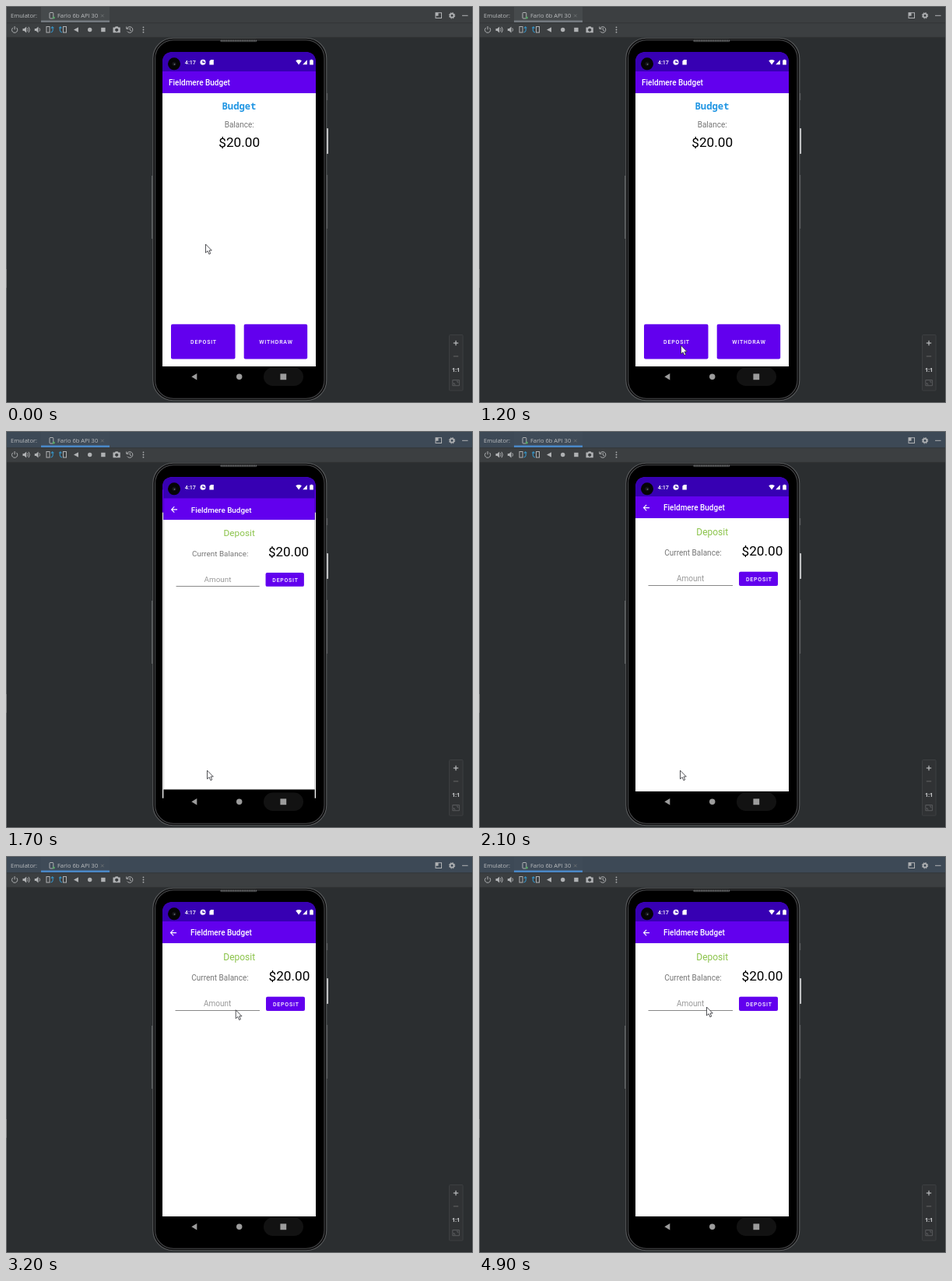
Write an HTML page that moves like this. It is 600 px wide and 510 px high and loops after 5 s.

```html
<!DOCTYPE html>
<html lang="en">
<head>
<meta charset="utf-8">
<title>Emulator demo</title>
<style>
html, body { margin: 0; width: 100%; height: 100%; overflow: hidden; background: #2b2e30; }
svg { display: block; width: 600px; height: 510px; }
text { font-family: Roboto, sans-serif; white-space: pre; }
.ide { font: 7.5px "Open Sans", "Noto Sans", sans-serif; fill: #bbbdbf; }
.title { font-size: 10px; font-weight: 500; fill: #fff; }
.label { font-size: 10px; fill: #757575; }
.money { font-size: 17.2px; fill: #000; text-anchor: middle; }
.btn { font-size: 7px; font-weight: 500; letter-spacing: .8px; fill: #fff; text-anchor: middle; }
.mid { text-anchor: middle; }
.line { fill: none; stroke: #afb1b3; stroke-width: 1; }
.blue { fill: none; stroke: #3592c4; stroke-width: 1.1; }
.solid { fill: #afb1b3; }
</style>
</head>
<body>
<svg viewBox="0 0 600 510" xmlns="http://www.w3.org/2000/svg">
  <defs>
    <clipPath id="screen"><path d="M201 486V73q0-14 14-14H384q14 0 14 14V486z"/></clipPath>
    <filter id="blur" x="-20%" y="-40%" width="140%" height="180%"><feGaussianBlur stdDeviation="2"/></filter>
    <g id="bars">
      <rect x="201" y="59" width="197" height="427" fill="#000"/>
      <rect x="201" y="59" width="197" height="54" fill="#6200ee"/>
      <rect x="201" y="59" width="197" height="25" fill="#3700b3"/>
      <rect x="201" y="112" width="197" height="351" fill="#fff"/>
    </g>
  </defs>

  <!-- IDE window -->
  <rect width="600" height="510" fill="#2b2e30"/>
  <rect width="600" height="40" fill="#3c3f41"/>
  <rect id="header" width="600" height="21.5"/>
  <rect id="tab" x="45" y="1" width="88" height="20"/>
  <rect id="underline" x="45" y="18.5" width="88" height="2.5"/>
  <path d="M0 21.8H600M0 40.3H600" stroke="#313335" stroke-width=".8"/>
  <rect x=".5" y=".5" width="599" height="509" stroke="#6c6e70" fill="none"/>
  <path d="M.4 338V362" stroke="#a0a0a0" stroke-width=".6"/>
  <text class="ide" x="6" y="15">Emulator:</text>
  <text class="ide" x="66" y="15">Farlo 6b API 30</text>
  <path d="M122 10.7l3.6 3.6m0-3.6l-3.6 3.6" stroke="#737678" stroke-width=".8"/>
  <rect class="line" x="56" y="8.5" width="4.8" height="7.5" rx=".8"/>
  <circle cx="61.3" cy="15" r="1.6" fill="#59a869"/>
  <rect class="line" x="552" y="8.7" width="7.5" height="6.8"/>
  <rect class="solid" x="552" y="8.7" width="3.5" height="4"/>
  <circle class="line" cx="573" cy="12.3" r="2.4" style="stroke-width:1.7"/>
  <circle class="line" cx="573" cy="12.3" r="3.7" stroke-dasharray="1.6 1.3"/>
  <path class="line" d="M586 12.3h7.5"/>

  <!-- Emulator tools -->
  <path class="line" d="M9 27.8a3.6 3.6 0 1 0 4.3 0M11.1 26v4.3"/>
  <path class="solid" d="M21.5 29h2l2.7-2.5v8l-2.7-2.5h-2zM36.8 29h2l2.7-2.5v8l-2.7-2.5h-2z"/>
  <path class="line" d="M27.5 28.4q1.7 2.1 0 4.2M29 26.8q3 3.7 0 7.4M42.8 28.4q1.7 2.1 0 4.2"/>
  <rect class="line" x="52" y="26.5" width="4" height="7.5"/>
  <path class="blue" d="M57.5 34q4-1 2.2-6.5M58 28.7l1.6-2 1.8 1.6"/>
  <rect class="line" x="73.5" y="26.5" width="4" height="7.5"/>
  <path class="blue" d="M72 34q-4-1-2.2-6.5M68.1 28.3l1.8-1.6 1.6 2"/>
  <path class="solid" d="M87 30.5l6-3.2v6.4z"/>
  <circle class="solid" cx="107.7" cy="30.5" r="2.7"/>
  <rect class="solid" x="122.2" y="27.8" width="5.4" height="5.4"/>
  <path class="solid" fill-rule="evenodd" d="M137.5 27.5h2.3l1-1.3h2.8l1 1.3h2.2v6.8h-9.3zM142.2 28.7a2.1 2.1 0 1 0 .01 0z"/>
  <path class="line" d="M155.5 29a3.8 3.8 0 1 1 .3 3.5M154.8 26.5v2.8h2.8M159.2 28.2v2.6l1.8 1"/>
  <path d="M176.5 27.3v0M176.5 30.5v0M176.5 33.7v0" stroke="#afb1b3" stroke-width="1.8" stroke-linecap="round"/>

  <!-- Zoom panel -->
  <rect x="569.5" y="422.5" width="17.5" height="71.5" rx="1" fill="#303234" stroke="#3c3f41"/>
  <path class="line" d="M574.8 433h6.4M578 429.8v6.4" style="stroke:#d0d2d4"/>
  <path class="line" d="M574.8 450h6.4" style="stroke:#666"/>
  <text class="ide mid" x="578" y="469.6" style="font-size:7px;font-weight:700;fill:#d0d2d4">1:1</text>
  <path d="M573.8 480.5h8.6v7.2h-8.6zM575.5 484v2h2M578.7 482.2h2v2" fill="none" stroke="#5e6062" stroke-width=".9"/>

  <!-- Phone body -->
  <path d="M187.8 218V299" stroke="#77797b" stroke-width="1"/>
  <path d="M412.6 112V121M412.6 217V286" stroke="#5c5e60" stroke-width="1.2"/>
  <rect x="411.5" y="157" width="2.5" height="33" rx=".8" fill="#d5d6d7"/>
  <rect x="188.8" y="41.3" width="223" height="465.4" rx="26" fill="#0c0c0d" stroke="#5a5c5e" stroke-width="1.1"/>
  <rect x="191.6" y="43.8" width="217.4" height="460.4" rx="23.5" fill="#000" stroke="#48494b" stroke-width="1.1"/>
  <rect x="275" y="42.8" width="47.5" height="3.4" rx="1.6" fill="#333435"/>
  <path d="M276 44.5H322" stroke="#707273" stroke-width="2" stroke-dasharray=".8 1"/>

  <g clip-path="url(#screen)">
    <g id="home">
      <use href="#bars"/>
      <text class="title" x="209" y="102.3">Fieldmere Budget</text>
      <text class="mid" x="299.5" y="133.3" style="font:600 12.2px 'Noto Sans Mono',monospace;fill:#2196e3">Budget</text>
      <text class="label mid" x="299.7" y="156">Balance:</text>
      <text class="money" x="299.7" y="180.8">$20.00</text>
      <rect id="shadow" x="213" y="412" width="81" height="45" rx="2" filter="url(#blur)" fill="#000"/>
      <rect x="212" y="408.7" width="82.5" height="44.8" rx="2" fill="#6200ee"/>
      <rect id="press" x="212" y="408.7" width="82.5" height="44.8" rx="2" fill="#fff"/>
      <rect x="305.7" y="408.7" width="81.5" height="44.8" rx="2" fill="#6200ee"/>
      <text class="btn" x="254" y="433.8">DEPOSIT</text>
      <text class="btn" x="347" y="433.8">WITHDRAW</text>
    </g>
    <g id="detail">
      <use href="#bars"/>
      <path d="M219 98.6h-7.2M215.2 94.8l-3.7 3.8 3.7 3.8" fill="none" stroke="#fff" stroke-width="1.1"/>
      <text class="title" x="237" y="102.3">Fieldmere Budget</text>
      <text class="mid" x="299.7" y="133.6" font-size="12" fill="#8bc34a">Deposit</text>
      <text class="label" x="238.3" y="160">Current Balance:</text>
      <text class="money" x="363.9" y="159.5">$20.00</text>
      <text class="label mid" x="271.6" y="193" style="fill:#999">Amount</text>
      <path d="M217.5 198.5H326" stroke="#7a7a7a" stroke-width=".9"/>
      <rect x="334" y="180.7" width="50" height="18.2" rx="2" fill="#6200ee"/>
      <text class="btn" x="359.8" y="192.5">DEPOSIT</text>
    </g>
  </g>

  <!-- System UI -->
  <circle cx="216" cy="74.3" r="8" fill="#050506"/>
  <circle cx="216" cy="74.3" r="2.6" fill="#15151a"/>
  <circle cx="216.5" cy="74.8" r=".9" fill="#70727c"/>
  <text x="229.8" y="75.2" font-size="7.2" font-weight="500" fill="#fff">4:17</text>
  <circle cx="253" cy="72.2" r="3.5" fill="#fff"/>
  <path d="M253 70.2v2.2h2.4" fill="none" stroke="#3700b3" stroke-width="1.2"/>
  <path d="M263.2 69h3.6v6.6h-5.4v-4.8z" fill="#fff"/>
  <path d="M372.3 70.3q3.8-2.8 7.6 0l-3.8 5.2zM381.2 75.3l5.6-6v6zM390.2 69.6h1.3v-.8h2v.8h1.3v6h-4.6z" fill="#fff"/>
  <rect x="331" y="464.5" width="51" height="23.5" rx="11.7" fill="#121212"/>
  <path d="M238.3 476.3l7-4.2v8.4z" fill="#9c9c9c"/>
  <circle cx="299.7" cy="476.3" r="3.7" fill="#9c9c9c"/>
  <rect x="352.4" y="472.4" width="7.8" height="7.8" fill="#9c9c9c"/>

  <path id="pointer" d="M0 0V11L2.6 8.7 4.4 12.8 6.2 12 4.5 8H7.8Z" fill="#fff" stroke="#26282c" stroke-width=".8"/>
</svg>
<script>
const LOOP = 5000, STEP = 100;
const FOCUS_AT = 1400, OPEN_AT = 1540, OPEN_MS = 400;
const CENTER = [299.5, 272.5];

// Pointer stops: start time, end time, x, y
const moves = [
  [0, 0, 256.5, 306],
  [50, 600, 259.5, 442],
  [700, 1000, 259.5, 436],
  [1200, 1500, 258.5, 436],
  [2500, 3250, 295.7, 194.7],
  [3400, 4700, 292.5, 194]
];

const $ = id => document.getElementById(id);
const clamp = v => Math.max(0, Math.min(1, v));
const mix = (a, b, p) => a + (b - a) * p;
const smooth = v => { v = clamp(v); return v * v * (3 - 2 * v); };
const cubic = (a, b, c, d, u) => {
  const v = 1 - u;
  return a * v * v * v + 3 * b * v * v * u + 3 * c * v * u * u + d * u * u * u;
};

// Two-part curve: quick start, very slow finish
function openEase(t) {
  const [xs, ys] = t < 1 / 6
    ? [[0, .05, .1333, 1 / 6], [0, 0, .06, .4]]
    : [[1 / 6, .2083, .25, 1], [.4, .82, 1, 1]];
  let lo = 0, hi = 1;
  for (let i = 0; i < 20; i++) {
    const u = (lo + hi) / 2;
    if (cubic(...xs, u) < t) lo = u; else hi = u;
  }
  return cubic(...ys, lo);
}

function zoom(el, s) {
  const [x, y] = CENTER;
  el.setAttribute("transform", `translate(${x} ${y}) scale(${s}) translate(${-x} ${-y})`);
}

function pointerAt(t) {
  let [, , x, y] = moves[0];
  for (const [from, to, nx, ny] of moves.slice(1)) {
    const p = smooth((t - from) / (to - from));
    x = mix(x, nx, p);
    y = mix(y, ny, p);
  }
  return [x, y];
}

function draw(t) {
  const focused = t >= FOCUS_AT;
  $("header").setAttribute("fill", focused ? "#3d4956" : "#3c3f41");
  $("tab").setAttribute("fill", focused ? "#3f4b58" : "#464a4c");
  $("underline").setAttribute("fill", focused ? "#4a88c7" : "#747a80");

  const press = clamp((t - 1300) / 200);
  $("press").setAttribute("opacity", .22 * press);
  $("shadow").setAttribute("opacity", .4 * press);

  const since = t - OPEN_AT;
  const p = openEase(clamp(since / OPEN_MS));
  zoom($("home"), mix(1, 1.05, p));
  zoom($("detail"), mix(.85, 1, p));
  $("home").setAttribute("visibility", since < OPEN_MS ? "visible" : "hidden");
  $("detail").setAttribute("opacity", clamp((since - 50) / 83));

  $("pointer").setAttribute("transform", `translate(${pointerAt(t)})`);
}

function tick() {
  const t = performance.now() % LOOP;
  draw(Math.floor(t / STEP) * STEP);
  requestAnimationFrame(tick);
}
tick();
</script>
</body>
</html>
```
